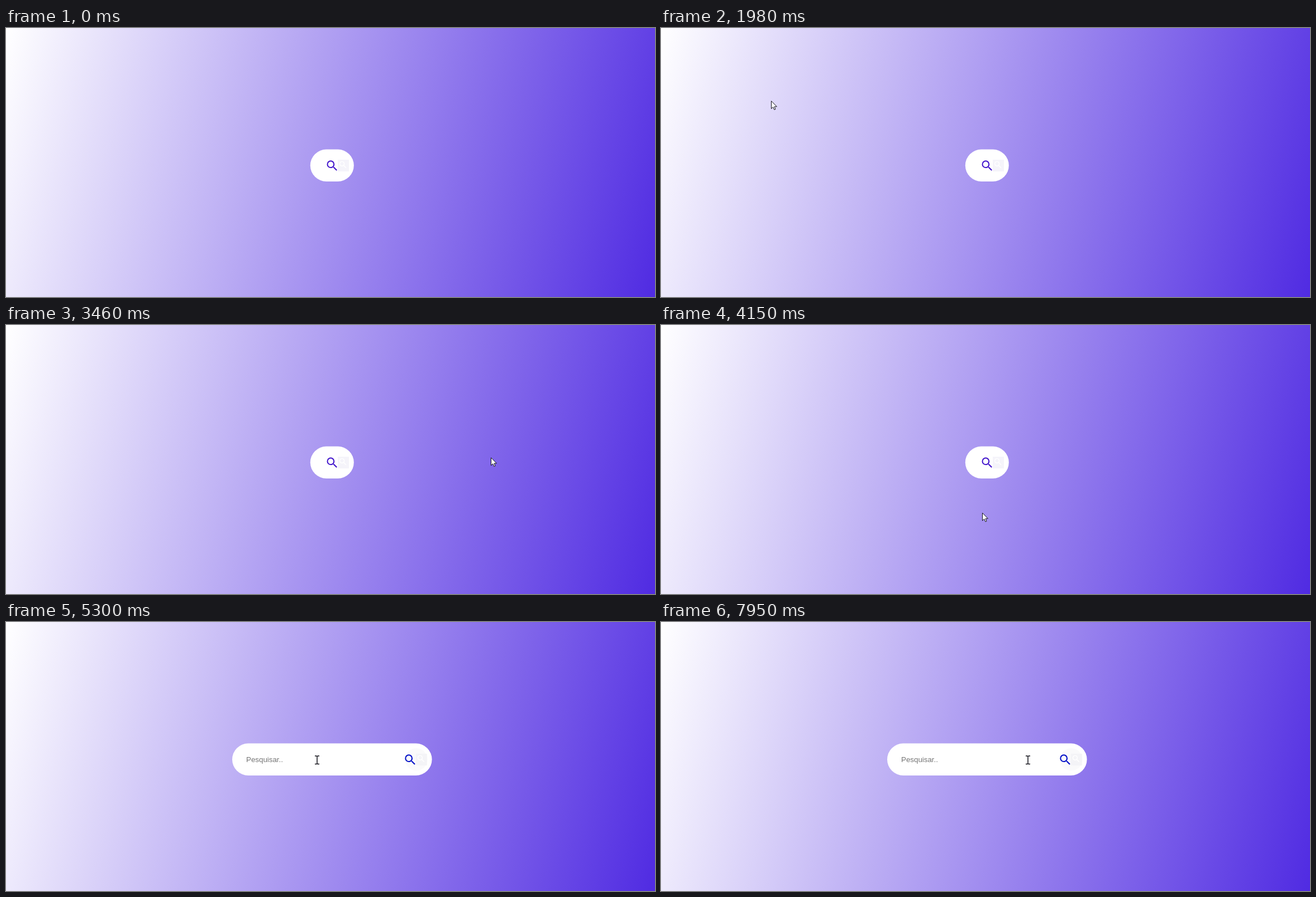
These frames come from a looping animation (1162 px wide and 482 px high, 8 s). An HTML page with a canvas:

```html
<!DOCTYPE html>
<html lang="pt">
<head>
<meta charset="utf-8">
<title>Pesquisar</title>
<style>
  html, body { margin: 0; width: 100%; height: 100%; overflow: hidden; }
  canvas { display: block; }
</style>
</head>
<body>
<canvas id="stage" width="1162" height="482"></canvas>
<script>
const ctx = document.getElementById('stage').getContext('2d');
const W = 1162, H = 482, LOOP = 8000;
const PILL = { cx: 583.8, top: 217.5, height: 57.5, closed: 78, open: 357.6, opensAt: 4939, duration: 300 };

// Bursts of movement: start, end, number of steps.
const bursts = [
  [440, 1190, 12], [1250, 1980, 11], [2120, 2920, 13], [2990, 3730, 11], [3800, 4290, 8],
  [4490, 5220, 12], [5300, 5300, 1], [5950, 6620, 11], [7810, 7950, 3]
];

// Pointer path: time, x, y of the hotspot.
const path = [
  [440, 955, 416], [560, 760, 300], [700, 400, 175], [820, 180, 141], [920, 90, 160],
  [985, 81, 190], [1050, 120, 205], [1121, 168, 194], [1190, 162, 180],
  [1250, 153, 160], [1320, 151, 143], [1450, 175, 124], [1600, 222, 130], [1700, 236, 150],
  [1850, 222, 150], [1980, 197, 130], [2053, 197, 130],
  [2250, 260, 100], [2400, 450, 82], [2600, 780, 100], [2786, 997, 134], [2920, 1028, 122],
  [3080, 1040, 109], [3250, 1000, 150], [3500, 820, 265], [3730, 679, 319],
  [3800, 658, 328], [4000, 600, 347], [4150, 575, 336], [4290, 569, 316], [4423, 569, 316],
  [4700, 565, 303], [4890, 560, 283], [5021, 557, 247], [5883, 557, 247],
  [6250, 610, 248], [6500, 695, 249], [6620, 720, 250], [7743, 720, 250],
  [7810, 710, 250], [7880, 688, 248], [7950, 657, 247]
];

const lens = new Path2D('M15.5 14h-.79l-.28-.27A6.47 6.47 0 0 0 16 9.5 6.5 6.5 0 1 0 9.5 16c1.61 0 3.09-.59 4.23-1.57l.27.28v.79l5 4.99L20.49 19l-4.99-5zm-6 0C7.01 14 5 11.99 5 9.5S7.01 5 9.5 5 14 7.01 14 9.5 11.99 14 9.5 14z');
const arrow = new Path2D('M.5 .8V14.6L3.7 11.6L5.8 16.4L8 15.5L6 10.9H10.4Z');
const hand = new Path2D('M4.7 12V1.8Q4.7 .6 5.9 .6T7.1 1.8V6.5Q9.4 5.4 9.8 7Q11.8 6.2 12.2 7.8Q14.3 7.3 14.4 9.2V13Q14.4 15 13.2 16.6Q12.8 19.3 10.5 19.4H7.6Q6 19.2 5.4 17.4Q3.5 15.5 2.2 13L.8 10.6Q.6 9 2.2 9Z');
const knuckles = new Path2D('M7.1 6.5V10M9.8 7V10M12.2 7.8V10');
const beam = new Path2D('M-4 -7H-1.2L0 -6.2L1.2 -7H4M-4 7.5H-1.2L0 6.7L1.2 7.5H4M0 -6.5V7');

const angle = 105 * Math.PI / 180;
const half = (W * Math.sin(angle) - H * Math.cos(angle)) / 2;
const dx = Math.sin(angle) * half, dy = -Math.cos(angle) * half;
const backdrop = ctx.createLinearGradient(W / 2 - dx, H / 2 - dy, W / 2 + dx, H / 2 + dy);
backdrop.addColorStop(0, '#ffffff');
backdrop.addColorStop(1, '#502be2');

function steppedTime(t) {
  const burst = bursts.filter(b => b[0] <= t).pop();
  if (!burst) return 0;
  const [start, end, count] = burst;
  if (count === 1) return start;
  const step = (end - start) / (count - 1);
  return Math.min(end, start + Math.floor((t - start) / step + 0.12) * step);
}

// Hermite curve through the path that never overshoots its points.
function slope(i, axis) {
  const a = path[i - 1], b = path[i], c = path[i + 1];
  if (!a || !c || (b[axis] - a[axis]) * (c[axis] - b[axis]) <= 0) return 0;
  return (c[axis] - a[axis]) / (c[0] - a[0]);
}

function pointerAt(t) {
  let i = path.findIndex(p => p[0] > t) - 1;
  if (i < 0) i = path.length - 2;
  const a = path[i], b = path[i + 1], span = b[0] - a[0];
  const u = Math.min(1, (t - a[0]) / span), v = 1 - u;
  return [1, 2].map(k => Math.round(
    a[k] * v * v * (1 + 2 * u) + b[k] * u * u * (1 + 2 * v) +
    span * u * v * (slope(i, k) * v - slope(i + 1, k) * u)));
}

// cubic-bezier(.25, .1, .25, 1)
function ease(x) {
  if (x <= 0) return 0;
  if (x >= 1) return 1;
  const bezier = (s, p, q) => 3 * s * (1 - s) * (1 - s) * p + 3 * s * s * (1 - s) * q + s * s * s;
  let low = 0, high = 1;
  for (let n = 0; n < 24; n++) {
    const mid = (low + high) / 2;
    if (bezier(mid, 0.25, 0.25) < x) low = mid; else high = mid;
  }
  return bezier(low, 0.1, 1);
}

function fillAt(shape, x, y, scale, color) {
  ctx.save();
  ctx.translate(x, y);
  ctx.scale(scale, scale);
  ctx.fillStyle = color;
  ctx.fill(shape);
  ctx.restore();
}

function drawPill(t) {
  const { cx, top, height, closed, open } = PILL;
  const width = closed + (open - closed) * ease((t - PILL.opensAt) / PILL.duration);
  const left = cx - width / 2, right = cx + width / 2;
  const opened = width > closed;

  ctx.fillStyle = '#fff';
  ctx.beginPath();
  ctx.roundRect(left, top, width, height, height / 2);
  ctx.fill();

  if (opened) {
    ctx.save();
    ctx.beginPath();
    ctx.rect(left + 25, top, width - closed, height);
    ctx.clip();
    ctx.fillStyle = '#757575';
    ctx.font = '13.333px "Liberation Sans", Arial, sans-serif';
    ctx.fillText('Pesquisar..', left + 25, 251);
    ctx.restore();

    ctx.fillStyle = '#fafafb';
    ctx.beginPath();
    ctx.arc(right - 28, 246.3, 20, 0, 7);
    ctx.fill();
  }

  ctx.fillStyle = opened ? '#f4f4f7' : '#f5f4fa';
  ctx.fillRect(right - 28.8, 236, 20, 21);
  fillAt(lens, right - 28, 236.5, 0.72, '#fff');
  fillAt(lens, right - 51.5, 234.1, 1.06, opened ? '#0412c8' : '#4418cc');
  return right;
}

function drawPointer(t, right) {
  const [x, y] = pointerAt(t);
  const inside = t > 4800 && y > 232 && y < 262;
  ctx.save();
  ctx.translate(x, y);
  ctx.strokeStyle = '#101018';
  ctx.fillStyle = '#fff';
  ctx.lineWidth = 1;
  if (!inside) {
    ctx.fill(arrow);
    ctx.stroke(arrow);
  } else if (x < right - 60) {
    ctx.lineWidth = 1.5;
    ctx.stroke(beam);
  } else {
    ctx.translate(-5.5, -0.5);
    ctx.fill(hand);
    ctx.stroke(hand);
    ctx.stroke(knuckles);
  }
  ctx.restore();
}

function draw(now) {
  const t = steppedTime(now % LOOP);
  ctx.fillStyle = backdrop;
  ctx.fillRect(0, 0, W, H);
  const right = drawPill(t);
  if (t) drawPointer(t, right);
  requestAnimationFrame(draw);
}
requestAnimationFrame(draw);
</script>
</body>
</html>
```
